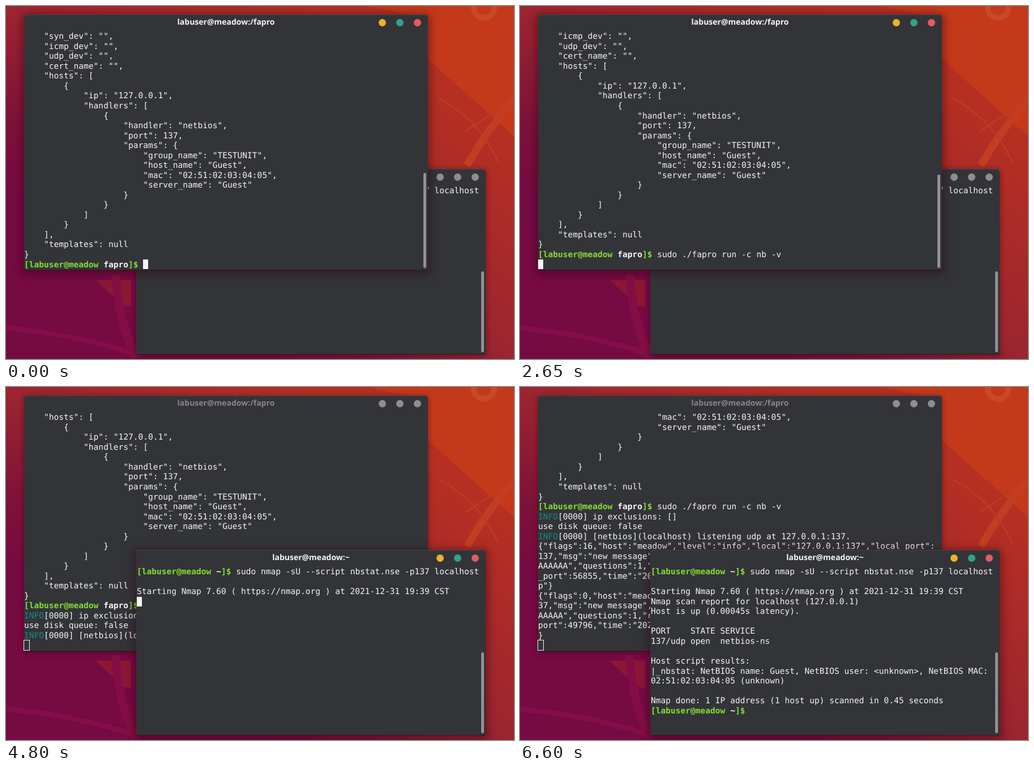
Animation, 897 px wide and 624 px high, one loop 7070 ms. Source, as an HTML page:

```html
<!DOCTYPE html>
<html lang="en">
<head>
<meta charset="utf-8">
<title>Terminal session</title>
<style>
html, body { margin: 0; width: 100%; height: 100%; overflow: hidden; background: #760a43; }
#stage { position: relative; width: 897px; height: 624px; overflow: hidden; text-rendering: geometricPrecision; }
#stage > svg { position: absolute; left: 0; top: 0; }
.win {
  position: absolute; z-index: 1; box-sizing: border-box; background: #333438;
  border-radius: 5px 5px 2px 2px; border-top: 1px solid #47474b; border-bottom: 1px solid #232327;
  box-shadow: 0 2px 9px 2px rgba(50, 0, 20, .38);
}
.win.focus { z-index: 2; box-shadow: 0 3px 14px 5px rgba(50, 0, 20, .42); }
#server { left: 32px; top: 15px; width: 713px; height: 452px; }
#client { left: 230px; top: 288px; width: 617px; height: 328px; }
.title {
  position: absolute; left: 0; right: 0; top: 3px; text-align: center;
  font: bold 14px/20px "Noto Sans", "Open Sans", sans-serif; color: #87868b;
}
.focus .title { color: #f6f6f5; }
.dot { position: absolute; top: 7px; width: 13px; height: 13px; border-radius: 50%; background: #8e8d91; }
.dot:nth-of-type(1) { right: 74.5px; }
.dot:nth-of-type(2) { right: 43px; }
.dot:nth-of-type(3) { right: 12px; }
.focus .dot:nth-of-type(1) { background: #e9b32f; }
.focus .dot:nth-of-type(2) { background: #2fa38c; }
.focus .dot:nth-of-type(3) { background: #e35c5f; }
pre {
  position: absolute; left: 0; top: 29.3px; margin: 0; color: #f6f6f5;
  font: 14.565px/17.53px "DejaVu Sans Mono", monospace;
}
#client pre { left: 1px; }
pre b { color: #86dd33; }
pre i { color: #f6f6f5; font-style: normal; }
pre u { color: #138a8a; text-decoration: none; }
.cursor { position: absolute; width: 9px; height: 17px; background: #f6f6f5; }
.win:not(.focus) .cursor { background: none; box-sizing: border-box; width: 11px; height: 19px; margin: -1px; border: 1px solid #f6f6f5; }
.bar { position: absolute; right: 3px; bottom: 3px; width: 5px; border-radius: 3px; background: #929195; }
#pointer { z-index: 3; }
</style>
</head>
<body>
<div id="stage">
  <svg width="897" height="624" fill="none">
    <defs>
      <linearGradient id="dusk" x1="0" y1="1" x2="1" y2="0">
        <stop offset=".25" stop-color="#760a43"/>
        <stop offset=".34" stop-color="#7e1139"/>
        <stop offset=".5" stop-color="#9c2530"/>
        <stop offset=".68" stop-color="#ab2b28"/>
        <stop offset=".8" stop-color="#b53022"/>
      </linearGradient>
    </defs>
    <path fill="url(#dusk)" d="M0 0H897V624H0z"/>
    <path fill="#c5391b" d="M640 0H897V230L765 112L735 85V20z"/>
    <circle cx="844" cy="3" r="18" stroke="#c94a22" stroke-width="10"/>
    <path stroke="#c33d22" stroke-width="13" d="M903 160Q855 210 814 282"/>
    <path stroke="#bd3a24" stroke-width="3" d="M764 163Q835 200 869 276M811 222L858 191"/>
    <path fill="#8b1733" d="M158 484L221 484V532L207 530Z"/>
    <path stroke="#850d4b" stroke-width="9" d="M0 569Q130 582 230 616"/>
    <path stroke="#850d45" stroke-width="15" d="M194 474Q196 550 230 622"/>
  </svg>
  <div class="win" id="server"></div>
  <div class="win" id="client"></div>
  <svg id="pointer" width="9" height="15" fill="none">
    <path id="beam" d="M1.5 1.5H3.5L4.5 2.5L5.5 1.5H7.5M4.5 2.5V12.5M1.5 13.5H3.5L4.5 12.5L5.5 13.5H7.5" stroke="#222" stroke-width="3"/>
    <use href="#beam"/>
    <path d="M1.5 1.5H3.5L4.5 2.5L5.5 1.5H7.5M4.5 2.5V12.5M1.5 13.5H3.5L4.5 12.5L5.5 13.5H7.5" stroke="#e4e4e4"/>
  </svg>
</div>
<script>
const LOOP = 7070, COL = 8.768, ROW = 17.53, LAST_ROW = 23;
const USER = 'labuser', HOST = 'meadow', NAME = 'Guest';

const prompt = dir => `<b>[${USER}@${HOST} <i>${dir}</i>]$</b> `;
const info = text => `<u>INFO</u>[0000] ${text}`;

const config = JSON.stringify({
  syn_dev: '', icmp_dev: '', udp_dev: '', cert_name: '',
  hosts: [{
    ip: '127.0.0.1',
    handlers: [{
      handler: 'netbios',
      port: 137,
      params: { group_name: 'TESTUNIT', host_name: NAME, mac: '02:51:02:03:04:05', server_name: NAME }
    }]
  }],
  templates: null
}, null, 4).split('\n').slice(1);

const RUN = 'sudo ./fapro run -c nb -v ';
const serverLines = [
  ...config,
  prompt('fapro') + RUN,
  info('ip exclusions: []'),
  'use disk queue: false',
  info('[netbios](localhost) listening udp at 127.0.0.1:137.'),
  `{"flags":16,"host":"${HOST}","level":"info","local":"127.0.0.1:137","local_port":`,
  '137,"msg":"new message","name":"',
  'AAAAAA","questions":1,"remote"',
  '_port":56855,"time":"2021-12-31',
  'p"}',
  `{"flags":0,"host":"${HOST}","level":"info"`,
  '37,"msg":"new message","name":"',
  'AAAAA","questions":1,"remote"',
  'port":49796,"time":"2021-12-31',
  '}'
];

const clientLines = [
  prompt('~') + 'sudo nmap -sU --script nbstat.nse -p137 localhost',
  '',
  'Starting Nmap 7.60 ( https://nmap.org ) at 2021-12-31 19:39 CST',
  'Nmap scan report for localhost (127.0.0.1)',
  'Host is up (0.00045s latency).',
  '',
  'PORT    STATE SERVICE',
  '137/udp open  netbios-ns',
  '',
  'Host script results:',
  `|_nbstat: NetBIOS name: ${NAME}, NetBIOS user: &lt;unknown&gt;, NetBIOS MAC:`,
  '02:51:02:03:04:05 (unknown)',
  '',
  'Nmap done: 1 IP address (1 host up) scanned in 0.45 seconds',
  prompt('~')
];

// Each step overrides part of the state and holds until changed again.
const steps = [
  [0, { server: config.length, typed: '', client: 1, focus: 'server', blink: true, bar: 168, pointer: null }],
  [70, { pointer: [780, 564] }],
  [140, { pointer: [645, 458] }],
  [200, { pointer: [590, 394] }],
  [270, { pointer: [583, 378], blink: false }],
  [340, { pointer: [581, 371] }],
  [870, { blink: true }],
  [1530, { typed: 'cat nb.json', pointer: null }],
  [1870, { typed: RUN }],
  [2250, { blink: false }],
  [2650, { server: 24, blink: true, bar: 165 }],
  [2730, { server: 27, bar: 157 }],
  [3260, { blink: false }],
  [3330, { pointer: [582, 374] }],
  [3400, { pointer: [586, 395] }],
  [3470, { pointer: [594, 434] }],
  [3530, { pointer: [603, 480] }],
  [3600, { pointer: [609, 515] }],
  [3670, { pointer: [613, 533] }],
  [3730, { pointer: [614, 539] }],
  [3800, { focus: 'client', blink: true }],
  [4000, { pointer: null }],
  [4400, { blink: false }],
  [4730, { client: 2, blink: true }],
  [4800, { client: 3 }],
  [5000, { server: 32 }],
  [5200, { server: 37 }],
  [5270, { client: 12 }],
  [5400, { client: 15, blink: false }],
  [5660, { pointer: [612, 536] }],
  [5730, { pointer: [560, 528] }],
  [5800, { pointer: [450, 508] }],
  [5870, { pointer: [325, 484] }],
  [5930, { pointer: [242, 465] }],
  [6000, { pointer: [215, 460], blink: true }],
  [6140, { pointer: [225, 474] }],
  [6200, { pointer: [237, 487] }],
  [6270, { pointer: null }],
  [6600, { blink: false }]
];

const $ = id => document.getElementById(id);

function makeWindow(id, title) {
  const root = $(id);
  root.innerHTML = '<span class="dot"></span>'.repeat(3) +
    `<div class="title">${title}</div><pre></pre><div class="bar"></div>`;
  return { root, text: root.querySelector('pre'), bar: root.querySelector('.bar') };
}
const server = makeWindow('server', `${USER}@${HOST}:/fapro`);
const client = makeWindow('client', `${USER}@${HOST}:~`);
client.bar.style.height = '143px';

function show(win, lines, col, row, focused, blink) {
  win.root.classList.toggle('focus', focused);
  const cursor = !focused || blink
    ? `<span class="cursor" style="left:${col * COL}px;top:${row * ROW}px"></span>` : '';
  win.text.innerHTML = lines.join('\n') + cursor;
}

function render(state) {
  const { server: count, client: printed, typed, focus, blink, pointer } = state;
  const atPrompt = count === config.length;
  const promptLength = USER.length + HOST.length + 'fapro'.length + 6;
  const current = atPrompt ? prompt('fapro') + typed : '';
  const visible = [...serverLines.slice(count - LAST_ROW, count), current];
  show(server, visible, atPrompt ? promptLength + typed.length : 0, LAST_ROW, focus === 'server', blink);
  server.bar.style.height = state.bar + 'px';

  const done = printed === clientLines.length;
  show(client, clientLines.slice(0, printed), done ? promptLength - 4 : 0,
    done ? printed - 1 : printed, focus === 'client', blink);

  $('pointer').style.display = pointer ? '' : 'none';
  if (pointer) {
    $('pointer').style.left = pointer[0] - 4 + 'px';
    $('pointer').style.top = pointer[1] - 7 + 'px';
  }
}

let shown = 0;
function tick() {
  const time = performance.now() % LOOP;
  const past = steps.filter(([start]) => start <= time);
  if (past.length !== shown) {
    shown = past.length;
    render(Object.assign({}, ...past.map(([, change]) => change)));
  }
  requestAnimationFrame(tick);
}
tick();
</script>
</body>
</html>
```
